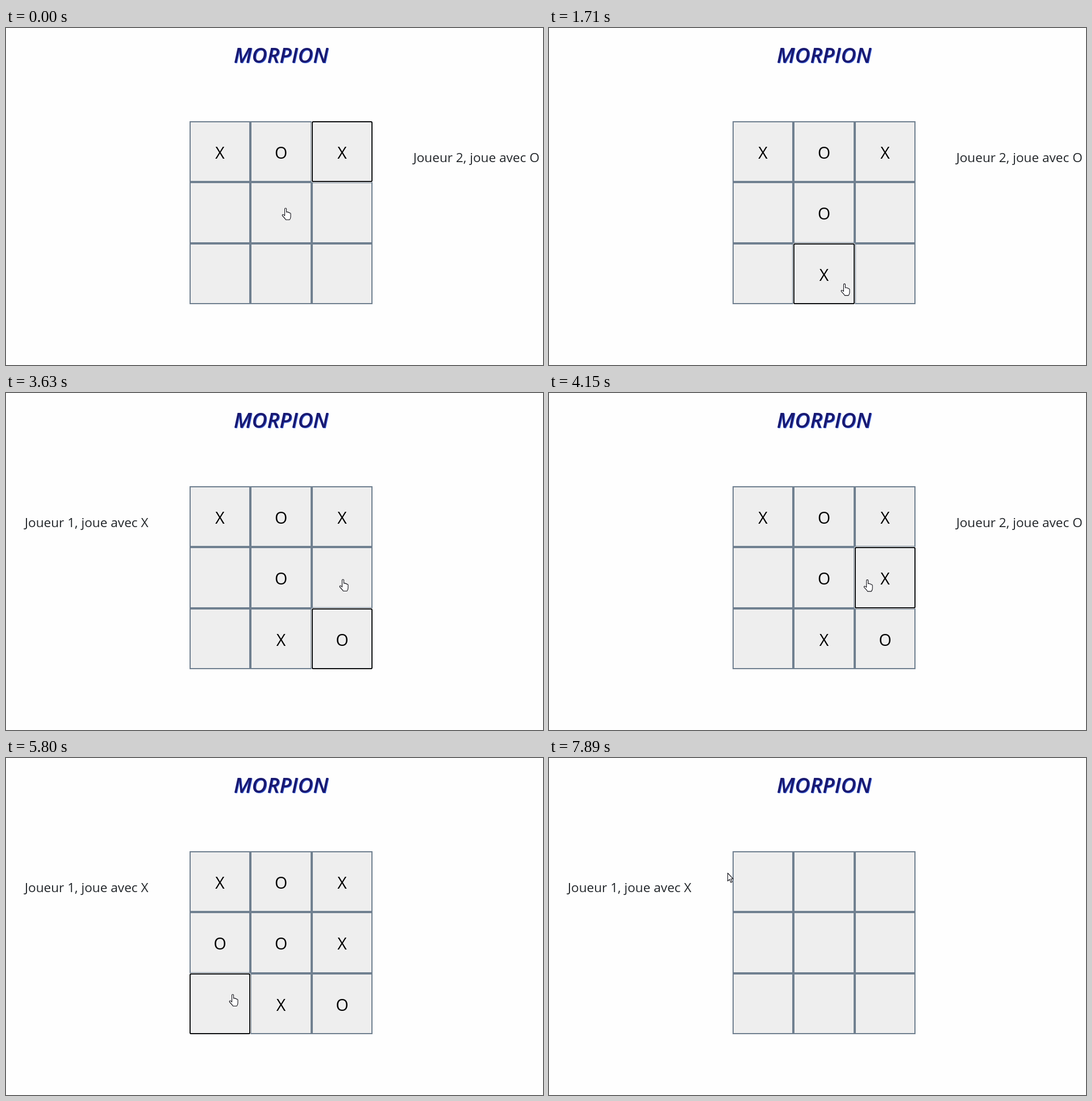
An HTML page that plays this animation: 945 by 593 pixels, repeating every 8 s.

```html
<!DOCTYPE html>
<html lang="fr">
<head>
<meta charset="utf-8">
<title>Morpion</title>
<style>
html, body { margin: 0; width: 100%; height: 100%; overflow: hidden; background: #fefefe; }
svg { display: block; width: 945px; height: 593px; }
text { font-family: "Open Sans", "Noto Sans", sans-serif; fill: #212529; }
.mid { text-anchor: middle; }
.title { font-size: 37px; font-weight: 600; font-style: italic; fill: #191970; text-shadow: 1px 1px #4169e1; }
.status { font-size: 22.6px; }
.end { font-size: 27.1px; font-weight: 600; }
.mark { font-size: 28.5px; fill: #000; }
.cell { fill: #eee; stroke: #708090; stroke-width: 2; }
.focus { fill: none; stroke: #000; stroke-width: 1.7; }
.ring { fill: none; stroke: #fff; }
.cursor { fill: #fff; stroke: #15151c; stroke-width: 1.1; stroke-linejoin: round; }
</style>
</head>
<body>
<svg viewBox="0 0 945 593">
  <text class="title mid" x="484" y="60.5">MORPION</text>
  <g id="board"></g>
  <g id="focus"><rect class="ring" rx="3"/><rect class="focus" rx="2.5"/></g>
  <g id="marks"></g>
  <text id="p1" class="status" x="33" y="236">Joueur 1, joue avec X</text>
  <text id="p2" class="status" x="716.7" y="236">Joueur 2, joue avec O</text>
  <text id="end" class="end mid" x="484.3" y="561">Le jeu est fini, personne n'a gagné.</text>
  <path id="hand" class="cursor" d="M5.5 13V2.5q0-1.5 1.5-1.5t1.5 1.5V8q2.5-1 3 .5 2-.5 2.4 1 2-.3 2.1 1.5v5q0 3-2 5.5H7.5Q6 19 1.5 14.5q-1-2 1-2.2 1.5.2 3 2z"/>
  <path id="arrow" class="cursor" d="M.5.5V14.5L3.7 11.6 6 17 8.3 16 6 10.8H10.3Z"/>
</svg>
<script>
const LOOP = 8000, RESET = 7590;
const $ = id => document.getElementById(id);

// Each turn: cell, mark, time pressed, time released
const turns = [
  [2, "X", -2, -1], [4, "O", 120, 255], [7, "X", 1210, 1340], [8, "O", 2350, 2490],
  [5, "X", 3750, 3890], [3, "O", 4860, 5000], [6, "X", 5800, 5920]
];
// Each move: first step, last step, number of steps, destination
const start = [493, 327];
const moves = [
  [390, 1060, 6, 494, 463], [1465, 2100, 6, 598, 452], [2610, 3360, 6, 594, 341],
  [3480, 3630, 2, 594, 338], [4030, 4450, 4, 384, 342], [5130, 5250, 2, 400, 426],
  [6190, 6325, 2, 28, 63], [7740, 7740, 1, 230, 132], [7890, 7890, 1, 314, 202]
];

const edge = (origin, i) => Math.round(origin + 107.5 * i);
const cells = Array.from({ length: 9 }, (_, i) => {
  const c = i % 3, r = Math.floor(i / 3);
  const x = edge(322.8, c), y = edge(163.9, r);
  return { x, y, w: edge(322.8, c + 1) - x, h: edge(163.9, r + 1) - y };
});

function add(parent, tag, attrs) {
  const el = document.createElementNS("http://www.w3.org/2000/svg", tag);
  for (const k in attrs) el.setAttribute(k, attrs[k]);
  return parent.appendChild(el);
}
function frame(el, { x, y, w, h }, inset) {
  el.setAttribute("x", x + inset);
  el.setAttribute("y", y + inset);
  el.setAttribute("width", w - 2 * inset);
  el.setAttribute("height", h - 2 * inset);
}
function show(el, on) { el.style.display = on ? "" : "none"; }

const marks = cells.map(c => {
  frame(add($("board"), "rect", { class: "cell" }), c, 1);
  return add($("marks"), "text", { class: "mark mid", x: c.x + c.w / 2, y: c.y + 66 });
});

function cursorAt(t) {
  let [x, y] = start;
  for (const [t0, t1, n, tx, ty] of moves) {
    if (t < t0) break;
    const gap = (t1 - t0) / (n - 1) || 1;
    const p = Math.min(n, Math.floor((t - t0) / gap + 1e-6) + 1) / n;
    const e = p * p * (3 - 2 * p);
    x += (tx - x) * e;
    y += (ty - y) * e;
  }
  return [x, y];
}

function draw(t) {
  const board = Array(9).fill("");
  let focus = -1, played = 0;
  if (t < RESET) {
    board[0] = "X";
    board[1] = "O";
    for (const [cell, mark, down, up] of turns) {
      if (t >= down) focus = cell;
      if (t >= up) { board[cell] = mark; played++; }
    }
  }
  marks.forEach((m, i) => { m.textContent = board[i]; });

  show($("focus"), focus >= 0);
  if (focus >= 0) {
    frame($("focus").children[0], cells[focus], -.5);
    frame($("focus").children[1], cells[focus], .85);
  }

  const done = played === turns.length;
  show($("p1"), !done && played % 2 === 0);
  show($("p2"), !done && played % 2 === 1);
  show($("end"), done);

  const [x, y] = cursorAt(t);
  const inside = x > 323 && x < 646 && y > 164 && y < 487;
  const visible = t < 6460 || t >= 7740;
  show($("hand"), visible && inside);
  show($("arrow"), visible && !inside);
  $("hand").setAttribute("transform", `translate(${x - 8} ${y - 11})`);
  $("arrow").setAttribute("transform", `translate(${x} ${y})`);
}

function tick() {
  draw(performance.now() % LOOP);
  requestAnimationFrame(tick);
}
tick();
</script>
</body>
</html>
```
